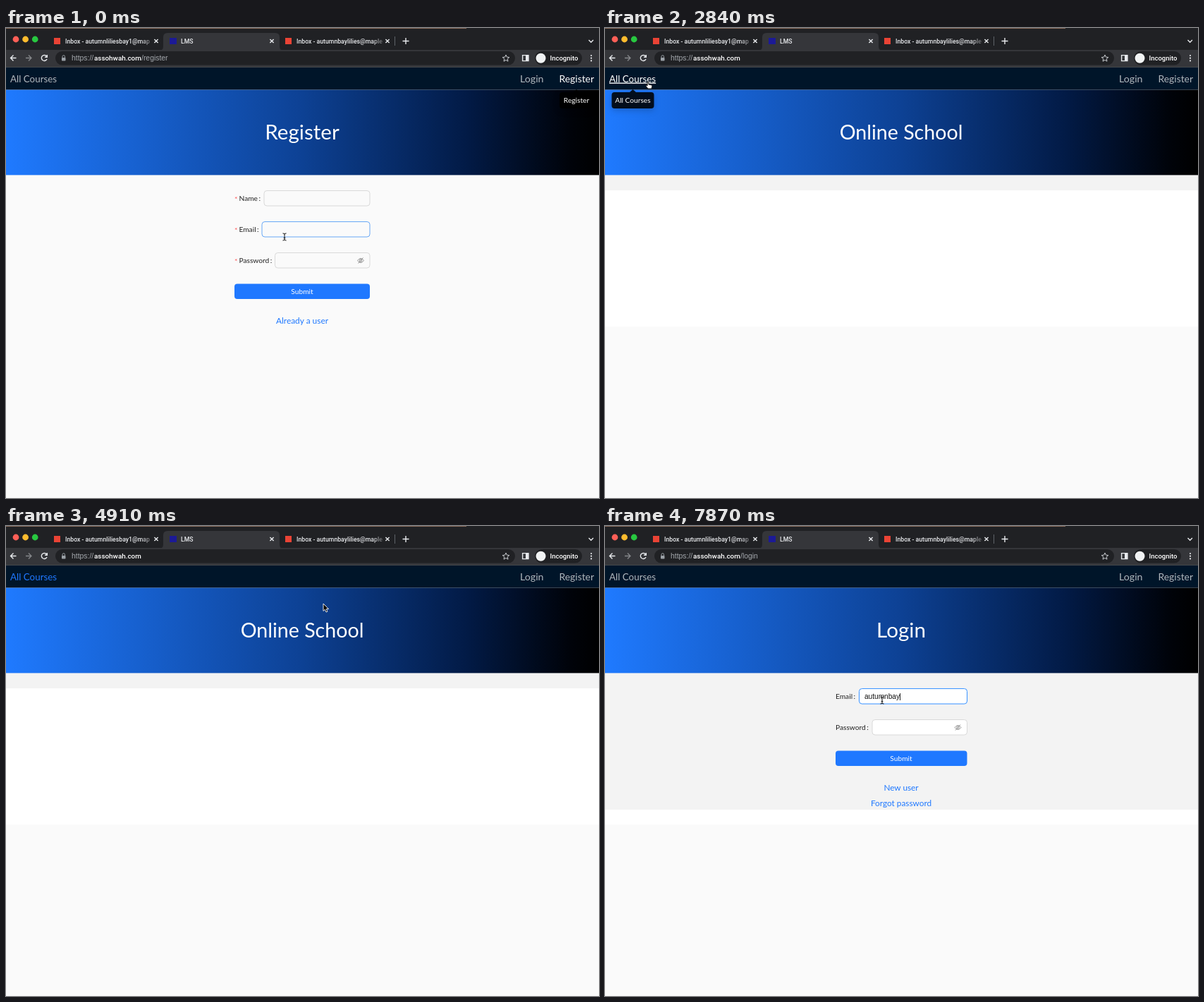
An HTML page that plays this animation: 841 by 666 pixels, repeating every 8000 ms.

```html
<!DOCTYPE html>
<html lang="en">
<head>
<meta charset="utf-8">
<title>LMS</title>
<style>
  html, body { margin: 0; height: 100%; overflow: hidden; background: #fafafa; }
  svg { display: block; width: 100vw; height: 100vh; font-family: Lato, sans-serif; }
  .tab { font: 500 8.7px Roboto, sans-serif; }
  .url { font: 10.4px "Liberation Sans", Arial, sans-serif; }
  .line { fill: none; stroke: #e8eaed; stroke-width: 1.4; }
  .tip { filter: drop-shadow(0 3px 5px rgba(0, 0, 0, .2)); }
</style>
</head>
<body>
<svg viewBox="0 0 841 666">
  <defs>
    <linearGradient id="banner">
      <stop stop-color="#1f7aff"/><stop offset=".5" stop-color="#0d4194"/>
      <stop offset=".78" stop-color="#021a45"/><stop offset=".95" stop-color="#00030a"/><stop offset="1"/>
    </linearGradient>
    <linearGradient id="fade">
      <stop stop-color="#202124" stop-opacity="0"/><stop offset=".75" stop-color="#202124"/>
    </linearGradient>
  </defs>
  <g id="page"></g>
  <g id="browser"></g>
  <g id="pointer"></g>
</svg>
<script>
const BLUE = '#1f78ff', NAVY = '#001529', DIM = '#b1b7bd', BAR = '#35363a', DARK = '#202124';
const $ = id => document.getElementById(id);

const rect = (x, y, w, h, fill, more = '') =>
  `<rect x="${x}" y="${y}" width="${w}" height="${h}" fill="${fill}" ${more}/>`;
const circle = (x, y, r, fill) => `<circle cx="${x}" cy="${y}" r="${r}" fill="${fill}"/>`;
const text = (x, y, s, size, fill, more = '') =>
  `<text x="${x}" y="${y}" font-size="${size}" fill="${fill}" ${more}>${s}</text>`;
const middle = (y, s, size, fill) => text(420, y, s, size, fill, 'text-anchor="middle"');
const path = (d, more = 'class="line"') => `<path d="${d}" ${more}/>`;

// Step times: about 150 ms apart, slightly quicker towards the end
const LOOP = 8000;
const times = Array.from({ length: 54 }, (_, k) => 150 * k - .03 * k * k - 5);
const within = (k, ...spans) => spans.some(([a, b]) => k >= a && k <= b);

// Pointer path: step, x, y, shape
const route = [
  [0, 395, 296, 'beam'], [1, 470, 262, 'arrow'], [3, 560, 235, 'arrow'], [5, 560, 235, 'arrow'],
  [7, 588, 224, 'arrow'], [8, 592, 222, 'arrow'], [9, 592, 222, 'arrow'], [10, 720, 149, 'arrow'],
  [11, 720, 149, 'arrow'], [12, 741, 76, 'hand'], [14, 500, 85, 'arrow'], [16, 61, 76, 'hand'],
  [20, 61, 76, 'hand'], [21, 105, 92, 'arrow'], [23, 283, 153.5, 'arrow'], [24, 332, 176, 'arrow'],
  [25, 332, 176, 'arrow'], [28, 61, 76, 'hand'], [30, 61, 76, 'hand'], [32, 450, 110, 'arrow'],
  [34, 800, 76, 'hand'], [36, 800, 76, 'hand'], [37, 741, 76, 'hand'], [39, 741, 76, 'hand'],
  [40, 690, 110, 'arrow'], [43, 410, 238, 'beam'], [44, 393, 247, 'beam'], [54, 393, 247, 'beam']
];
const shapes = {
  arrow: path('M0 0V10.4L2.4 8.3 4 12 5.9 11.2 4.3 7.6H7.5Z', 'stroke="#fff" stroke-width=".9"'),
  hand: path('M-.9.9Q0-.6.9.9V4L4.8 4.9Q6 5.2 5.8 6.5L5 10H0L-3 6.2Q-3.1 4.8-1.6 5.4L-.9 6Z',
    'fill="#fff" stroke="#111" stroke-width=".9"'),
  beam: path('M-2.5-5Q0-5 0-3.8Q0-5 2.5-5M0-4V4M-2.5 5Q0 5 0 3.8Q0 5 2.5 5M-1.3 1.5H1.3',
    'fill="none" stroke="#111" stroke-width="1"')
};

function pointer(k) {
  const i = route.findLastIndex(p => p[0] <= k);
  const [a, x, y, kind] = route[i], [b, x2, y2, next] = route[i + 1];
  const u = (k - a) / (b - a);
  const shape = u && kind !== next ? 'arrow' : kind;
  return `<g transform="translate(${x + (x2 - x) * u} ${y + (y2 - y) * u})">${shapes[shape]}</g>`;
}

function link(x, s, size, color, underlined) {
  return text(x, 76.5, s, size, color, underlined ? 'text-decoration="underline"' : '');
}

function tip(x, w, s) {
  const c = x + w / 2;
  return '<g class="tip"><g opacity=".87">' + path(`M${c - 5} 91.5L${c} 87L${c + 5} 91.5Z`, '') +
    rect(x, 91, w, 23, '#000', 'rx="4"') + '</g></g>' +
    text(c, 106, s, 10.2, '#fff', 'text-anchor="middle"');
}

function nav(k) {
  const allColor = within(k, [31, 38]) ? BLUE : within(k, [17, 30]) ? '#fff' : DIM;
  const loginLit = within(k, [12, 16], [37, 41]);
  const registerLit = within(k, [0, 1], [34, 38]);
  return rect(0, 55, 841, 32.4, NAVY) +
    link(6, 'All Courses', 13.4, allColor, within(k, [16, 20], [28, 30])) +
    link(729, 'Login', 14.2, loginLit ? '#fff' : DIM, within(k, [12, 13], [37, 39])) +
    link(784.5, 'Register', 13.9, registerLit ? '#fff' : DIM, within(k, [34, 36]));
}

function tips(k) {
  return (within(k, [17, 21], [29, 31]) ? tip(9.5, 60, 'All Courses') : '') +
    (within(k, [37, 40]) ? tip(728.5, 35, 'Login') : '') +
    (within(k, [0, 1], [35, 36]) ? tip(785, 48, 'Register') : '');
}

function field(label, x, left, right, y, fill, { star, border = '#d9d9d9', eye } = {}) {
  const ex = right - 13, ey = y + 11;
  return (star ? text(x - 6.5, y + 15, '*', 10.2, '#ff4d4f') : '') +
    text(x, y + 14.5, `${label}<tspan dx="1.5">:</tspan>`, 10.2, '#222') +
    rect(left, y, right - left, 21.5, fill, `rx="4" stroke="${border}"`) +
    (eye ? path(`M${ex - 4.5} ${ey}q4.5-6 9 0q-4.5 6-9 0zm2.7 0a1.8 1.8 0 1 0 3.6 0a1.8 1.8 0 1 0-3.6 0M${ex - 3.5} ${ey + 4}l7-8`,
      'fill="none" stroke="#8a8a8a" stroke-width=".9"') : '');
}

const button = (x, w, y) => rect(x, y, w, 21.5, BLUE, 'rx="4"') + middle(y + 14.3, 'Submit', 10.2, '#fff');

function registerPage(k) {
  const loaded = k >= 5, fill = loaded ? '#fff' : '#fafafa', star = true;
  return rect(0, 208, 841, 215, loaded ? '#f3f3f3' : '#fafafa') +
    field('Name', 330.5, 366, 516, 230.5, fill, { star }) +
    field('Email', 330.5, 363, 516, 274.5, fill, { star, border: k < 1 ? '#68a8f5' : '#d9d9d9' }) +
    field('Password', 330.5, 381.5, 516, 318.5, fill, { star, eye: true }) +
    button(324, 192, 362.5) + middle(418.5, 'Already a user', 11.9, BLUE);
}

const homePage = () => rect(0, 208, 841, 22, '#f3f3f3') + rect(0, 230, 841, 193, '#fff');

function loginPage(k) {
  const focused = k >= 44;
  const count = k >= 53 ? 9 : k >= 52 ? 7 : k >= 50 ? 6 : k >= 49 ? 5 : Math.max(0, k - 45);
  const caret = focused ? '<tspan dx="-1" font-size="11.5">|</tspan>' : '';
  return rect(0, 208, 841, 194, '#f3f3f3') + rect(0, 402, 841, 21, '#fff') +
    (focused ? rect(359.5, 229.5, 155, 23.5, '#dbe9fd', 'rx="5"') : '') +
    field('Email', 327, 360.5, 513.5, 230.5, '#fff', { border: focused ? '#4096ff' : '#d9d9d9' }) +
    text(368, 245, 'autumnbay'.slice(0, count) + caret, 10.1, '#111', 'font-family="Liberation Sans, Arial, sans-serif"') +
    field('Password', 327, 379, 513.5, 274.5, '#fff', { eye: true }) +
    button(327, 186.5, 318.5) +
    middle(374.5, 'New user', 11.8, BLUE) + middle(397, 'Forgot password', 11.8, BLUE);
}

function page(k) {
  const [title, size, body] = k < 18 ? ['Register', 29.6, registerPage] :
    k < 39 ? ['Online School', 28.6, homePage] : ['Login', 29.6, loginPage];
  return `<g transform="translate(0 ${within(k, [6, 7]) ? -1 : 0})">` +
    body(k) + rect(0, 87.4, 841, 121, 'url(#banner)') + nav(k) +
    middle(158, title, size, '#fff') + tips(k) + '</g>';
}

const cross = x => path(`M${x - 2.6} 15.9l5.2 5.2m0-5.2l-5.2 5.2`);

function mailTab(x, s, end) {
  return rect(x, 14, 9, 9, '#ea4335') + text(x + 16, 21.5, s, 8.7, '#e8eaed', 'class="tab"') +
    rect(end - 14, 10, 28, 16, 'url(#fade)') + cross(end + 8);
}

function browser(k) {
  const tail = k < 17 ? '/register' : k < 38 ? '' : '/login';
  return rect(0, 0, 841, 32, DARK) + rect(0, 0, 653, 1, '#86695a') +
    ['#ff5f57', '#febc2e', '#28c840'].map((c, i) => circle(14 + i * 13.6, 16, 4.4, c)).join('') +
    mailTab(68, 'Inbox - autumnliliesbay1@map', 205) +
    mailTab(396, 'Inbox - autumnbaylilies@maple', 533) +
    path('M217 32Q223 32 223 26V13Q223 7 229 7H382Q388 7 388 13V26Q388 32 394 32Z', `fill="${BAR}"`) +
    rect(232, 14, 10, 9, '#1c1a96') + text(248, 21.5, 'LMS', 8.5, '#e8eaed', 'class="tab"') + cross(377) +
    rect(551, 12, 1, 13, '#5f6368') + path('M562.5 18.5h9m-4.5-4.5v9M826.5 17l3.2 3.2 3.2-3.2') +
    rect(0, 31, 841, 24.5, BAR) + rect(0, 55, 841, 1, '#44474b') +
    rect(70, 33, 652, 19.5, DARK, 'rx="9.7"') + rect(750, 33, 67, 19.5, DARK, 'rx="9.7"') +
    path('M14.5 42.5H6.5m4-4l-4 4 4 4') +
    path('M28 42.5h8m-4-4l4 4-4 4', 'fill="none" stroke="#85878a" stroke-width="1.3"') +
    path('M57.5 40A4 4 0 1 0 58 44M58.3 38v3.2h-3.2') +
    rect(79, 42, 5.5, 4.5, '#9aa0a6', 'rx=".7"') +
    path('M80 42v-1.5a1.75 1.75 0 0 1 3.5 0V42', 'fill="none" stroke="#9aa0a6"') +
    `<text class="url" y="46" fill="#a4a8ad"><tspan x="93">https://</tspan>` +
    `<tspan x="125" fill="#fff" font-family="Roboto, sans-serif" font-weight="500" font-size="9.85">assohwah.com</tspan>` +
    `<tspan x="192">${tail}</tspan></text>` +
    path('M709 38l1.4 3.2 3.5.3-2.7 2.3.8 3.4-3-1.8-3 1.8.8-3.4-2.7-2.3 3.5-.3Z',
      'fill="none" stroke="#c8cbcf" stroke-width="1"') +
    path('M732.6 38.6h8.3v8h-8.3z') + rect(737, 39, 4, 8, '#e8eaed') +
    circle(758.5, 42.7, 7, '#f1f3f4') +
    text(771.5, 46, 'Incognito', 9.5, '#fff', 'style="font-family:Roboto,sans-serif;font-weight:500"') +
    [39, 42.7, 46.4].map(y => circle(830, y, 1.1, '#e8eaed')).join('');
}

const start = performance.now();
let shown = -1;
function draw() {
  const t = (performance.now() - start) % LOOP;
  const k = times.findLastIndex(s => s <= t);
  if (k !== shown) {
    shown = k;
    $('page').innerHTML = page(k);
    $('browser').innerHTML = browser(k);
    $('pointer').innerHTML = pointer(k);
  }
  requestAnimationFrame(draw);
}
draw();
</script>
</body>
</html>
```
